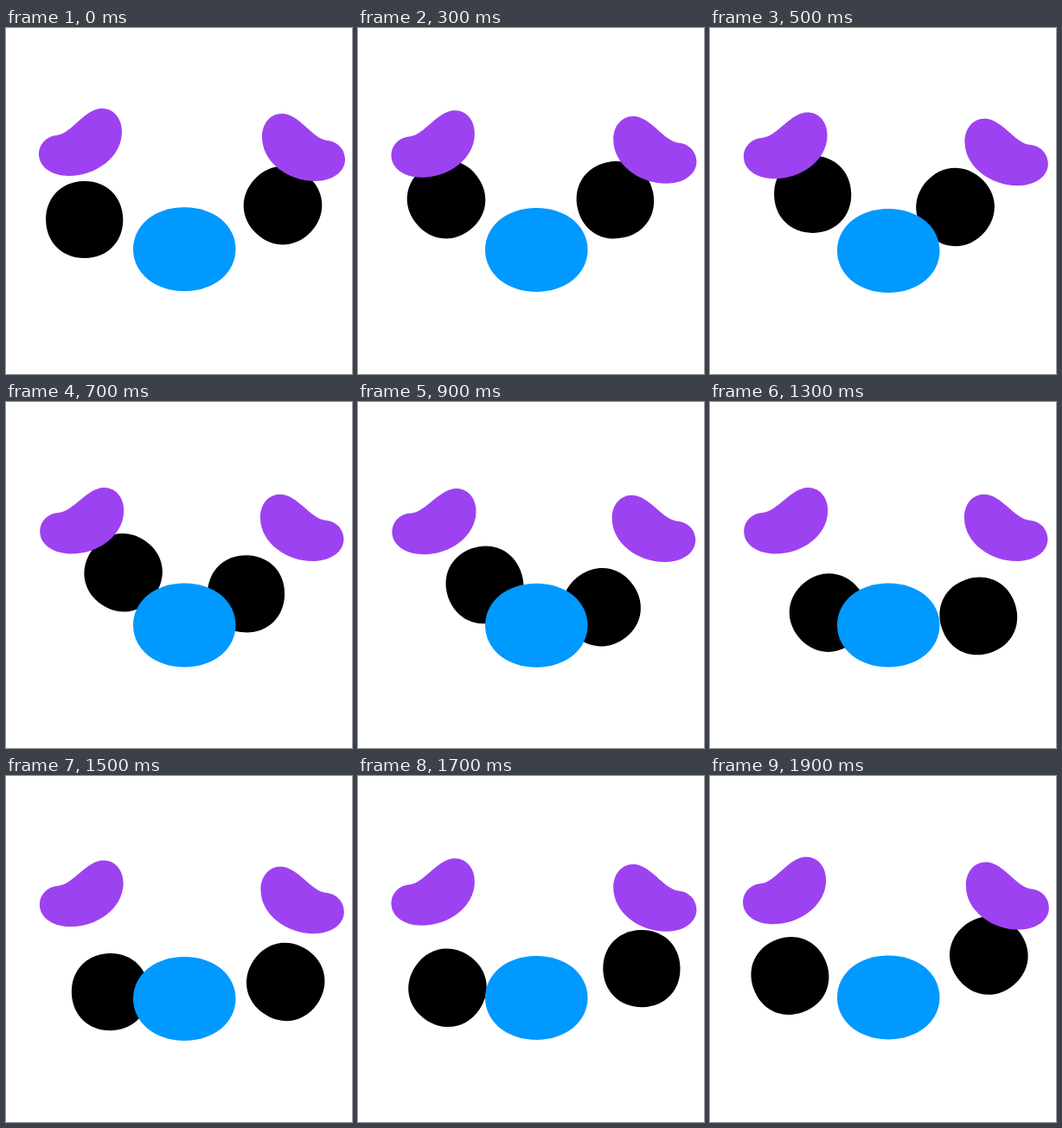
An HTML page that plays this animation: 400 px wide and 400 px high, repeating every 2000 ms.

```html
<!DOCTYPE html>
<html lang="en">
<head>
<meta charset="utf-8">
<title>Bouncy face</title>
<style>
  html, body { margin: 0; width: 100%; height: 100%; overflow: hidden; background: #fff; }
  svg { display: block; width: 100%; height: 100%; }
</style>
</head>
<body>
<svg viewBox="0 0 400 400">
  <defs>
    <path id="eye" d="M-44.6 0C-44.6-26-26-44.6 0-44.6S44.6-26 44.6 0S26 44.6 0 44.6S-44.6 26-44.6 0Z"/>
    <path id="brow" fill="#9d42f0" d="M38 146C38 134 47 125 59 124C76 122 91 93 111 93C124 93 134 104 134 120C134 149 104 171 73 171C52 171 38 160 38 146Z"/>
  </defs>
  <g transform="translate(119.4 221)"><g id="leftOrbit"><use href="#eye" x="-28.7"/></g></g>
  <g transform="translate(302.7 223.4)"><g id="rightOrbit"><use href="#eye" x="25.2"/></g></g>
  <use id="leftBrow" href="#brow"/>
  <g transform="translate(430 6) scale(-1 1)"><use id="rightBrow" href="#brow"/></g>
  <path id="nose" fill="#0099ff" d="M147 255.7C147 228 172 207.2 206.2 207.2S265.5 228 265.5 255.7S240 304.2 206.2 304.2S147 283.4 147 255.7Z"/>
</svg>
<script>
  const LOOP = 2000, STEP = 100;
  const place = (id, transform) => document.getElementById(id).setAttribute('transform', transform);

  // Out and back, quick to start and slow to settle at the far end.
  function bob(phase) {
    const p = 1 - Math.abs(1 - 2 * phase);
    return (1 - Math.cos(Math.PI * p ** 0.77)) / 2;
  }

  function moveBrow(id, amount, dx, dy, turn) {
    place(id, `translate(${dx * amount} ${dy * amount}) rotate(${turn * amount} 86 133)`);
  }

  const start = performance.now();
  function draw(now) {
    const elapsed = Math.max(0, now - start) % LOOP;
    const phase = Math.floor(elapsed / STEP) * STEP / LOOP;
    const amount = bob(phase);
    // The orbits do not close exactly, so they snap at the loop point.
    place('leftOrbit', `rotate(${-1 + 358.6 * phase})`);
    place('rightOrbit', `rotate(${-46.5 - 371 * phase})`);
    moveBrow('leftBrow', amount, 2, 5.8, 2.7);
    moveBrow('rightBrow', amount, 2.1, 8.4, 1.3);
    place('nose', `translate(0 ${2.7 * amount})`);
    requestAnimationFrame(draw);
  }
  draw(start);
</script>
</body>
</html>
```
